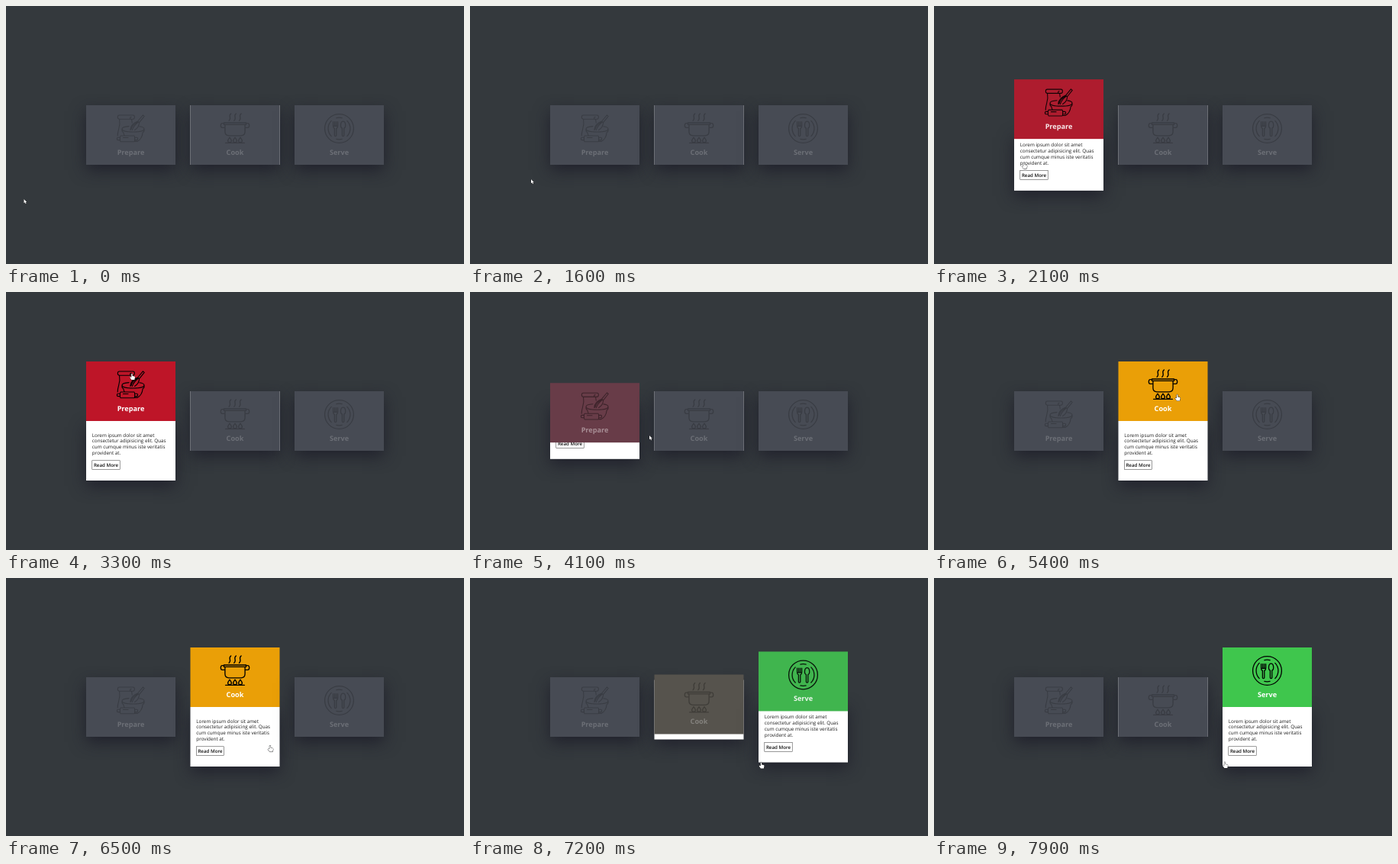
An HTML page with a canvas that plays this animation: 600x338 px, repeating every 8 s.

```html
<!DOCTYPE html>
<html lang="en">
<head>
<meta charset="utf-8">
<title>Cooking cards</title>
<style>
  html, body { margin: 0; width: 100%; height: 100%; overflow: hidden; background: #34393d; }
  canvas { display: block; width: 600px; height: 338px; }
</style>
</head>
<body>
<canvas id="stage"></canvas>
<script>
const W = 600, H = 338, LOOP = 8000, STEP = 100;
const CARD_W = 117, CARD_H = 78, REST_Y = 130, TRAVEL = 39, HOVER_MS = 500;
const FONT = '"Open Sans", "Noto Sans", sans-serif';
const REST_COLOR = [71, 75, 84];
const LINES = ['Lorem ipsum dolor sit amet', 'consectetur adipisicing elit. Quas',
  'cum cumque minus iste veritatis', 'provident at.'];

const canvas = document.getElementById('stage');
const ctx = canvas.getContext('2d');
const ratio = window.devicePixelRatio || 1;
canvas.width = W * ratio;
canvas.height = H * ratio;

// Icons are drawn in a 39 by 39 box.
const prepareIcon = [
  // bag with rolled top
  'M4.5 2H22.5C25 2 25 7.2 22.5 7.2H19.8C18 7.2 18.4 4.4 20 4.4',
  'M4.5 2C1.6 2 1.6 7.2 4.5 7.2H19.5',
  'M4.6 7.4C5.4 12 5 16 3.6 20.5C2.6 24 2.2 26 2.2 29',
  'M20.6 7.4L21.2 12',
  // whisk
  'M35.4 1.8L37.2 3.3L30.6 11.6L28.6 10Z',
  'M28.6 10C23.5 11.5 19 16 18.8 21.2M30.6 11.6C30.4 16 28 19.5 24.6 21.4',
  'M29.4 11C25.5 14 22.5 17.5 21.4 21.4M29 10.6C24.4 13 20.6 17 19.8 21',
  // bowl
  'M17 16.6C11.5 17 8 18.2 8 20C8 22.6 14.6 24 22.5 24C30.5 24 37 22.6 37 20C37 18.2 34.5 17.2 30.8 16.7',
  'M8 20V22.4C8 23.3 8.8 24 9.8 24.5C10 26.2 10.4 27.4 11.2 28.6M37 20V22.4C37 23.3 36.2 24 35.2 24.5C34.6 30.2 32 34.4 28 36.4H24.8',
  // rolling pin
  'M6.5 29H23.6C25 29 25 36.8 23.6 36.8H6.5C5 36.8 5 29 6.5 29Z',
  'M5.4 31.2H2.8C.9 31.2 .9 34.6 2.8 34.6H5.4M24.6 31.2H27.2C29.1 31.2 29.1 34.6 27.2 34.6H24.6',
  'M9.5 31.5H16'
];

const steam = x => `M${x + 1.4} 0C${x - 3} 3.4 ${x + 3} 5.4 ${x - 1.2} 9.2`;
const flame = x => `M${x} 31.2C${x + 1.4} 33 ${x + 2.7} 34.6 ${x + 2.4} 36.2C${x + 2} 38.3 ${x - 2} 38.3 ${x - 2.4} 36.2C${x - 2.7} 34.6 ${x - 1.4} 33 ${x} 31.2Z`;
const cookIcon = [
  ...[12.8, 19.5, 26.2].map(steam),
  'M5 12H34V14.4H5Z',
  'M6.4 14.4V23.6C6.4 26.8 8.4 28.8 11.6 28.8H27.4C30.6 28.8 32.6 26.8 32.6 23.6V14.4',
  'M5 12.6H2.8C.2 12.6 .2 18.4 2.8 18.4H6.2M34 12.6H36.2C38.8 12.6 38.8 18.4 36.2 18.4H32.8',
  ...[12.5, 19.5, 26.5].map(flame),
  'M7.2 38.4H31.8'
];

const serveIcon = [
  'M.6 19.5A18.9 18.9 0 1 1 38.4 19.5A18.9 18.9 0 1 1 .6 19.5Z',
  'M9.2 9.4A14.4 14.4 0 0 0 9.2 29.6M29.8 9.4A14.4 14.4 0 0 1 29.8 29.6',
  'M15.9 5.6A14.4 14.4 0 0 1 23.1 5.6M15.9 33.4A14.4 14.4 0 0 0 23.1 33.4',
  // fork
  'M11.6 10.6V16.2C11.6 18.2 12.4 19 13.4 19.4V28.6C13.4 30 15.8 30 15.8 28.6V19.4C16.8 19 17.6 18.2 17.6 16.2V10.6',
  'M13.6 10.6V15.8M15.6 10.6V15.8M11.6 16.4H17.6',
  // spoon
  'M24.6 10.2C28.2 10.2 28.8 18 25.8 19.2V28.6C25.8 30 23.4 30 23.4 28.6V19.2C20.4 18 21 10.2 24.6 10.2Z'
];

const card = (x, title, color, icon, weight, on, off) =>
  ({ x, title, color, icon: new Path2D(icon.join('')), weight, on, off });
const cards = [
  card(105, 'Prepare', [190, 21, 40], prepareIcon, 1.1, 1812, 3885),
  card(241.5, 'Cook', [234, 159, 7], cookIcon, 1.35, 4810, 6880),
  card(378, 'Serve', [63, 198, 77], serveIcon, 1.3, 6917, Infinity)
];

// Pointer path: time, x, y
const path = [
  [1000, 23.5, 253], [1300, 46, 246], [1600, 80, 227], [1812, 105, 212], [2100, 118, 205],
  [2500, 124, 214], [2800, 115, 217], [3100, 138, 152], [3300, 165, 107], [3500, 196, 138],
  [3700, 206, 180], [3885, 222, 188], [4100, 235, 188], [4600, 235, 188], [4810, 242, 187],
  [5000, 294, 180], [5300, 328, 148], [5600, 300, 107], [5900, 260, 140], [6200, 292, 194],
  [6400, 342, 205], [6500, 346, 219.5], [6800, 351, 214], [6880, 359, 208], [6917, 378, 204],
  [7000, 404, 206], [7100, 396, 228], [7200, 381.5, 241.5], [7900, 381, 241]
];
const arrow = new Path2D('M0 0V5.2L1.3 4.2L2.2 6.2L3.1 5.8L2.2 3.9H3.8Z');
const hand = new Path2D('M-.7 .6C-.7-.3 .6-.3 .6 .6V3.1L3 3.6C3.8 3.8 4 4.2 3.9 4.9L3.3 8.1H-.6L-2.6 5.2C-2.9 4.5-2 4-1.4 4.5L-.7 5.1Z');

const clamp = v => Math.min(1, Math.max(0, v));
const bez = (u, a, b) => 3 * u * (1 - u) * (1 - u) * a + 3 * u * u * (1 - u) * b + u * u * u;

// CSS "ease": cubic-bezier(.25, .1, .25, 1)
function ease(v) {
  const x = clamp(v);
  if (x === 0 || x === 1) return x;
  let lo = 0, hi = 1;
  for (let i = 0; i < 24; i++) {
    const mid = (lo + hi) / 2;
    if (bez(mid, .25, .25) < x) lo = mid; else hi = mid;
  }
  return bez(lo, .1, 1);
}

const mix = (a, b, p) => `rgb(${a.map((v, i) => Math.round(v + (b[i] - v) * p)).join(',')})`;

function text(str, x, y, size, weight, color, align = 'left') {
  ctx.font = `${weight} ${size}px ${FONT}`;
  ctx.textAlign = align;
  ctx.fillStyle = color;
  ctx.fillText(str, x, y);
}

function drawBack(x, y) {
  ctx.save();
  ctx.shadowColor = 'rgba(28,28,40,.8)';
  ctx.shadowBlur = 19.5 * ratio;
  ctx.shadowOffsetY = 7.8 * ratio;
  ctx.fillStyle = '#fff';
  ctx.fillRect(x, y, CARD_W, CARD_H);
  ctx.restore();
  LINES.forEach((line, i) => text(line, x + 7.8, y + 20.6 + i * 7.84, 6.34, 500, '#1c1c1c'));
  ctx.strokeStyle = '#333';
  ctx.lineWidth = .5;
  ctx.strokeRect(x + 7.8, y + 51.8, 36.4, 11.9);
  text('Read More', x + 26, y + 60.1, 6.2, 600, '#111', 'center');
}

function drawFront(c, y, open) {
  ctx.fillStyle = mix(REST_COLOR, c.color, open);
  ctx.fillRect(c.x, y, CARD_W, CARD_H);
  ctx.save();
  ctx.globalAlpha = .2 + .8 * open;
  text(c.title, c.x + CARD_W / 2, y + 64.6, 9.15, 700, '#fff', 'center');
  ctx.translate(c.x + 39, y + 11);
  ctx.strokeStyle = '#000';
  ctx.lineWidth = c.weight;
  ctx.lineCap = ctx.lineJoin = 'round';
  ctx.stroke(c.icon);
  ctx.restore();
}

function drawCard(c, t) {
  const open = ease((t - c.on) / HOVER_MS) - ease((t - c.off) / HOVER_MS);
  drawBack(c.x, REST_Y + TRAVEL * open);
  drawFront(c, REST_Y - TRAVEL * open, open);
}

function pointerAt(t) {
  const i = path.findIndex(p => p[0] > t);
  if (i === 0) return path[0].slice(1);
  if (i < 0) return path[path.length - 1].slice(1);
  const [t0, x0, y0] = path[i - 1], [t1, x1, y1] = path[i];
  const p = (t - t0) / (t1 - t0);
  return [x0 + (x1 - x0) * p, y0 + (y1 - y0) * p];
}

function drawPointer(t) {
  const [x, y] = pointerAt(t);
  const shape = cards.some(c => t >= c.on && t < c.off) ? hand : arrow;
  ctx.save();
  ctx.translate(x, y);
  ctx.lineJoin = 'round';
  ctx.lineWidth = .9;
  ctx.strokeStyle = '#1b1c1f';
  ctx.stroke(shape);
  ctx.fillStyle = '#fff';
  ctx.fill(shape);
  ctx.restore();
}

function draw(t) {
  ctx.setTransform(ratio, 0, 0, ratio, 0, 0);
  ctx.textRendering = 'geometricPrecision';
  ctx.fillStyle = '#34393d';
  ctx.fillRect(0, 0, W, H);
  cards.forEach(c => drawCard(c, t));
  drawPointer(t);
}

const start = performance.now();
function tick() {
  const t = (performance.now() - start) % LOOP;
  draw(Math.floor(t / STEP) * STEP);
  requestAnimationFrame(tick);
}
tick();
</script>
</body>
</html>
```
